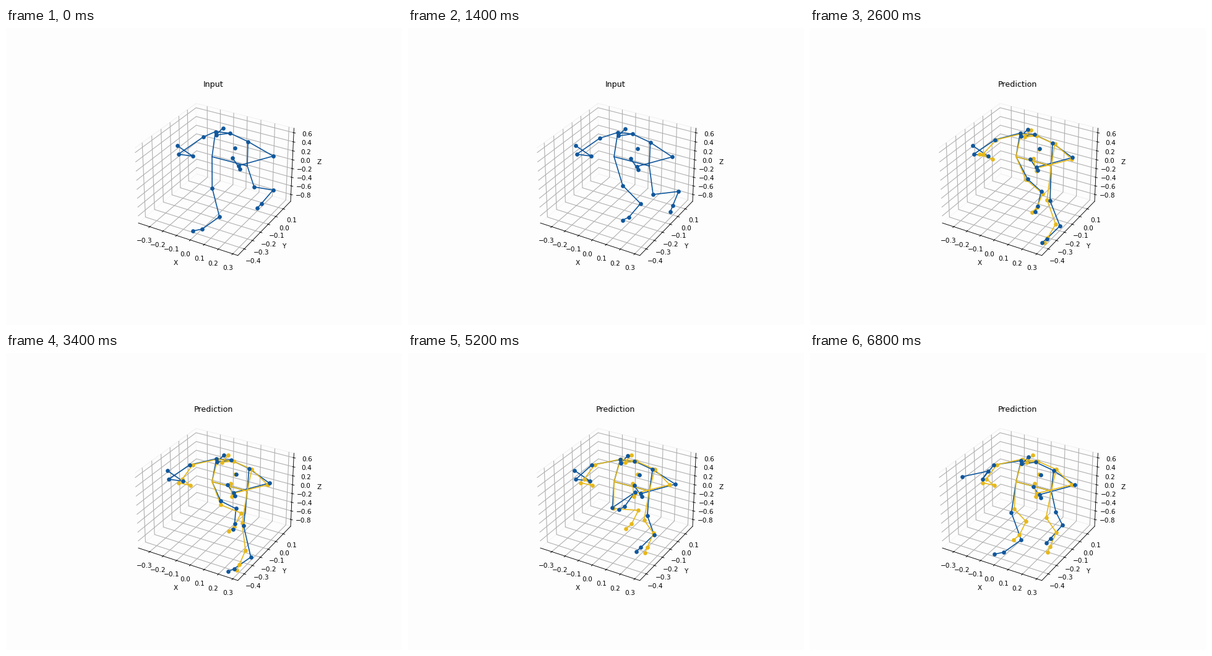
A matplotlib script for the animation above (7000 ms loop, 640 by 480 pixels).

```python
import numpy as np
import matplotlib.pyplot as plt
from matplotlib.animation import FuncAnimation
from matplotlib.ticker import MultipleLocator

W, H, DPI = 640, 480, 80
FRAMES, STEP = 35, 200
SWITCH = 10          # first predicted frame
PAPER, BLUE, YELLOW = "#fdfdfd", "#10579c", "#e7b81a"
HIP_L, HIP_R = np.array([(333, 208), (390, 223)], float)

# neck, face, crown, left shoulder, right shoulder, loose marker
TORSO = np.array([(363.5, 173.5), (341, 176.5), (352, 165),
                  (340, 171), (392.5, 187), (371.5, 196)])
LEAN = np.array([(4, 1.5), (8, 0), (7, 0), (2, 0.5), (4.5, 1), (-2, 0)])


def ease(k, start, end):
    s = np.clip((k - start) / (end - start), 0, 1)
    return s * s * (3 - 2 * s)


def bump(k, centre, width):
    return np.exp(-((k - centre) / width) ** 2)


def wave(k, peak, period):
    return np.cos(2 * np.pi * (k - peak) / period)


def chain(start, *steps):
    """Joints reached by adding one step after another."""
    return np.cumsum([start, *steps], axis=0)


def limb(first, second, *steps):
    """Two placed joints, then steps onward from the second."""
    return np.vstack([first, chain(second, *steps)])


def side_sway(k):
    return -1.5 + 0.08 * k + 4 * bump(k, 23, 4)


def true_pose(k):
    sink = -3.5 + 0.19 * k
    torso = TORSO + (side_sway(k), sink)
    torso[-1, 1] -= sink / 2

    bend, twist = ease(k, 0, 16), ease(k, 29, 34)
    wrist = np.array([270.5 + 8 * wave(k, 0, 34), 204])
    left_arm = np.vstack([
        (319 - 22 * bend, 176 + 5 * bend),
        wrist,
        wrist + (23 - 14 * twist, 3 - 16 * twist),
        wrist + (-2 - 31 * twist, -14 + 10 * twist),
    ])

    swing = wave(k, 27, 28)
    right_arm = limb((428 + 4 * swing, 210.5 + sink), (371 + 5 * swing, 226 + sink),
                     (2, 5), (-12, -18))

    # left leg: raised slowly behind, then swung forward quickly
    lift = ease(k, -1, 8) * (1 - ease(k, 25, 35))
    roll = wave(k, 0, 34)
    left_leg = limb(
        (325 + 27 * bump(k, 12, 11), 259 - 20 * bump(k, 18, 9)),
        (337 + (43 - 0.5 * k) * np.sqrt(lift), 305 - 3.15 * k * lift),
        (-15 - 13 * roll, 22.5 - 2.5 * roll),
        (-9 - 6 * roll, 6 - 3 * roll))

    # right leg: swings through, plants, then trails
    drop = ease(k, 6, 15.5) * (1 - 0.77 * ease(k, 15, 32))
    plant, toe_off = bump(k, 19, 6), bump(k, 7, 4)
    right_leg = limb(
        (392 - 9 * wave(k, 20, 40), 268 + 12 * wave(k, 15, 34)),
        (394 + 52 * bump(k, 4, 7) + 14 * ease(k, 22, 34), 262 + 70 * drop),
        (-19 - 9 * plant + 10 * toe_off, 21.5 - 3 * plant + toe_off),
        (-7 - 3 * plant + 3 * toe_off, 7.5 - 3.5 * plant + 2.5 * toe_off))

    return [torso, left_arm, right_arm, left_leg, right_leg]


def settled_pose(k):
    """The calmer forecast: a still upper body over a smoothed walk."""
    torso = TORSO + LEAN + (0.6 * side_sway(k), 0)
    left_arm = limb((302, 180.5), (285, 203.5), (12.5, 10.5), (-19, -4.5))
    right_arm = limb((423, 213), (366.5, 227), (-1.5, 4.5), (-2, -20.5))
    reach = ease(k, 15, 29)
    left_leg = limb(
        (348 - 18 * reach, 245 + 7 * reach),
        (380 - 0.12 * (k - 18) ** 2, 253 + 0.16 * (k - 23) ** 2),
        (-11, 22), (-9, 7.5))
    right_leg = limb(
        (381.5, 277 - 0.53 * (k - 13)),
        (398 - 12 * bump(k, 18.5, 5), 290 + 31 * bump(k, 15.5, 6)),
        (-10, 23), (-4, 8.5))
    return [torso, left_arm, right_arm, left_leg, right_leg]


def guess_pose(k):
    drift = ease(k, SWITCH - 1, SWITCH + 5)
    return [t + drift * (s - t) for t, s in zip(true_pose(k), settled_pose(k))]


def bones(pose):
    torso, left_arm, right_arm, left_leg, right_leg = pose
    neck, face, crown, left, right, _ = torso
    chains = [
        [HIP_L, left, neck, right, HIP_R, HIP_L],
        [neck, face, crown],
        [left, *left_arm],
        [right, *right_arm],
        [HIP_L, *left_leg],
        [HIP_R, *right_leg],
    ]
    gap = (np.nan, np.nan)
    return np.array([p for points in chains for p in (*points, gap)]).T


plt.rcParams.update({"grid.linewidth": 1.0, "axes.labelsize": 9.5, "axes.titlesize": 11.4,
                     "xtick.labelsize": 9.5, "ytick.labelsize": 9.5})
fig = plt.figure(figsize=(W / DPI, H / DPI), dpi=DPI, facecolor=PAPER)

side, left_edge, bottom_edge = 286, 192.4, 94.3
room = fig.add_axes([left_edge / W, bottom_edge / H, side / W, side / H], projection="3d")
room.view_init(elev=30, azim=-60)
room.patch.set_visible(False)
room.set(xlim=(-0.386, 0.335), ylim=(-0.476, 0.203), zlim=(-0.961, 0.698))
room.set_xlabel("X")
room.set_ylabel("Y")
room.set_zlabel("Z", labelpad=3)
room.xaxis.set_major_locator(MultipleLocator(0.1))
room.yaxis.set_ticks(np.arange(-4, 2) / 10)
room.zaxis.set_major_locator(MultipleLocator(0.2))
for axis in (room.xaxis, room.yaxis, room.zaxis):
    axis.set_major_formatter("{x:.1f}")
    axis.pane.set_facecolor(PAPER)
    axis.pane.set_edgecolor("#f1f1f1")
    axis.pane.set_alpha(1)
title = room.set_title("Input", y=1.0, pad=25)

stage = fig.add_axes([0, 0, 1, 1])
stage.set(xlim=(0, W), ylim=(H, 0))
stage.axis("off")


def body_artists(color, line_z, dot_z):
    lines, = stage.plot([], [], color=color, lw=1.5, zorder=line_z)
    dots, = stage.plot([], [], "o", color=color, ms=6, mew=0, zorder=dot_z)
    return lines, dots


true_art = body_artists(BLUE, 2, 5)
guess_art = body_artists(YELLOW, 3, 4)


def show(artists, pose):
    lines, dots = artists
    lines.set_data(*bones(pose))
    dots.set_data(*np.vstack(pose).T)


def update(k):
    predicted = k >= SWITCH
    title.set_text("Prediction" if predicted else "Input")
    show(true_art, true_pose(k))
    show(guess_art, guess_pose(k))
    for artist in guess_art:
        artist.set_visible(predicted)
    return (*true_art, *guess_art, title)


anim = FuncAnimation(fig, update, frames=FRAMES, interval=STEP, repeat=True,
                     repeat_delay=0, init_func=lambda: update(0), blit=False)
plt.show()
```
